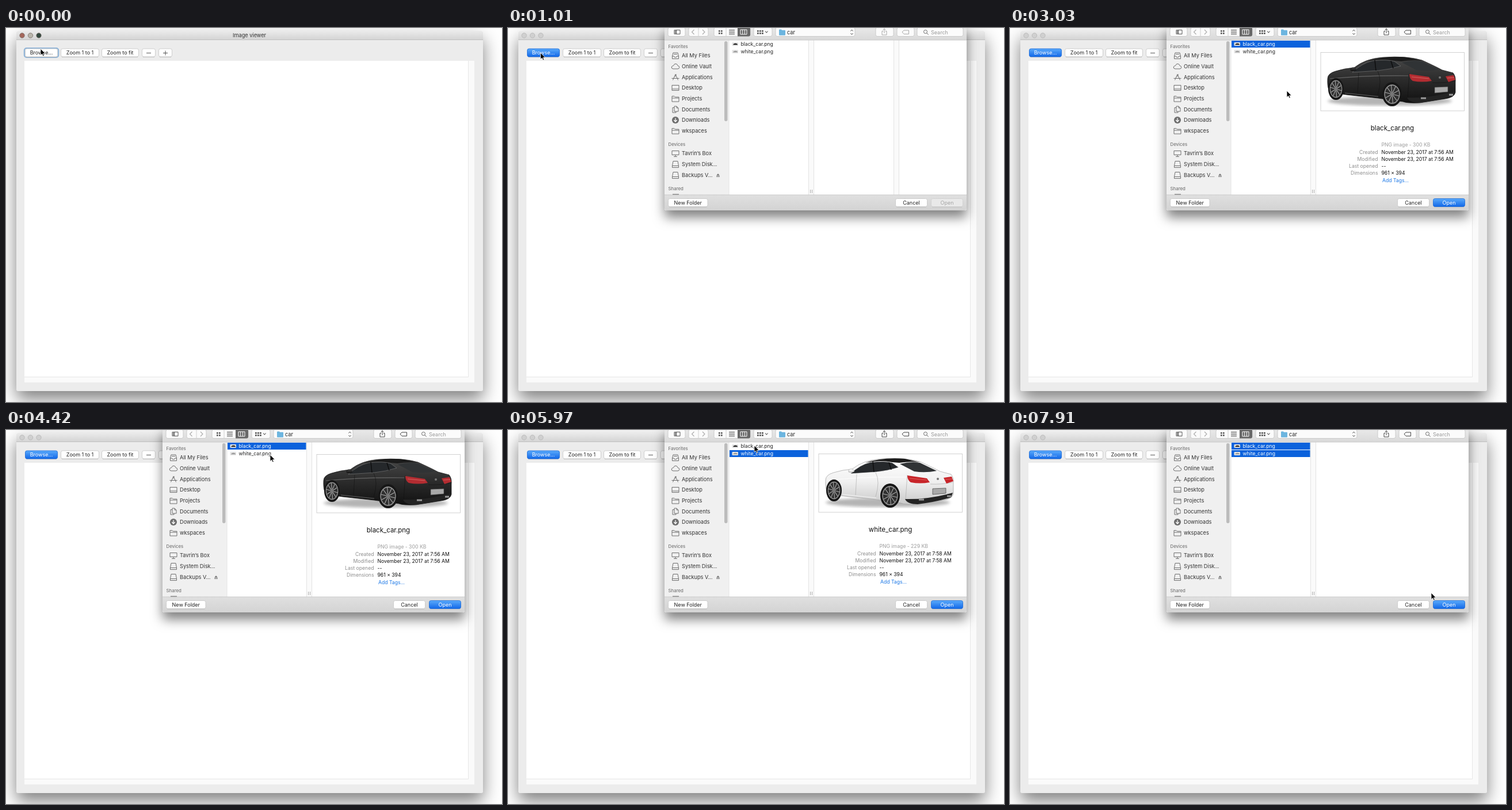
Animation of 862 by 650 pixels, one loop 7.99 s. Source, as an HTML page:

```html
<!DOCTYPE html>
<html lang="en">
<head>
<meta charset="utf-8">
<title>Image viewer</title>
<style>
  html, body { margin: 0; width: 100%; height: 100%; overflow: hidden; background: #fff; }
  svg { display: block; width: 862px; height: 650px; }
  text { font-family: Inter, "Open Sans", sans-serif; font-size: 9px; white-space: pre; }
</style>
</head>
<body>
<svg id="stage" viewBox="0 0 862 650" xmlns="http://www.w3.org/2000/svg"></svg>
<script>
const LOOP = 7990;

// Drawing helpers; text is placed by its vertical centre.
const rect = (x, y, w, h, fill, more = '') =>
  `<rect x="${x}" y="${y}" width="${w}" height="${h}" fill="${fill}" ${more}/>`;
const line = (d, color = '#666', width = 1, more = '') =>
  `<path d="${d}" fill="none" stroke="${color}" stroke-width="${width}" ${more}/>`;
const shape = (d, fill, more = '') => `<path d="${d}" fill="${fill}" ${more}/>`;
const text = (x, cy, s, size = 9, fill = '#222', more = '') =>
  `<text x="${x}" y="${(cy + size * 0.36).toFixed(2)}" style="font-size:${size}px" fill="${fill}" ${more}>${s}</text>`;
const middle = 'text-anchor="middle"';
const group = (id, body, more = '') => `<g id="${id}" ${more}>${body}</g>`;
const gradient = (id, ...colors) => `<linearGradient id="${id}" x2="0" y2="1">` +
  colors.map((c, i) => `<stop offset="${i / (colors.length - 1)}" stop-color="${c}"/>`).join('') +
  '</linearGradient>';
const shadow = (id, dy, blur, alpha) =>
  `<filter id="${id}" x="-20%" y="-20%" width="140%" height="150%">
    <feDropShadow dx="0" dy="${dy}" stdDeviation="${blur}" flood-opacity="${alpha}"/></filter>`;

function button(x, y, w, label, style = 'plain') {
  const [fill, edge, ink] = {
    plain: ['#fff', '#c4c4c4', '#222'],
    blue: ['url(#blue)', '#1a69d6', '#fff'],
    off: ['#e9e9e9', '#cfcfcf', '#a5a5a5']
  }[style];
  return line(`M${x + 2} ${y + 15}h${w - 4}`, '#aaa', 0.7) +
    rect(x + .5, y + .5, w - 1, 14, fill, `rx="3" stroke="${edge}" stroke-width=".8"`) +
    text(x + w / 2, y + 7.3, label, 9, ink, middle);
}
const toolBox = (x, w) => rect(x, -1, w, 15.5, '#fbfbfb', 'rx="3" stroke="#c3c3c3" stroke-width=".8"');

function lights(colors, edge) {
  return colors.map((c, i) =>
    `<circle cx="${28 + i * 14.5}" cy="13" r="4.2" fill="${c}" stroke="${edge}" stroke-width=".8"/>`).join('');
}

function mainWindow() {
  return group('window',
    rect(18, 5, 811, 626, '#ececec', 'rx="4" filter="url(#windowShadow)"') +
    shape('M18 21V9q0-4 4-4H825q4 0 4 4V21Z', 'url(#titleBar)') +
    line('M18 20.5H829', '#bcbcbc', .8)) +
    text(423, 13, 'Image viewer', 9.2, '#333', middle) +
    group('lightsOn', lights(['#a4665b', '#b9b6ac', '#33483f'], '#776b66')) +
    group('lightsOff', lights(['#d0d0d0', '#d0d0d0', '#d0d0d0'], '#b4b4b4')) +
    rect(32, 57, 782, 559, '#fafafa') + rect(32, 57, 772, 549, '#fff') +
    line('M32 606.5H804M803.5 57V606', '#e7e7e7') +
    group('focusRing', rect(31.8, 35, 59.5, 16, 'none', 'rx="4" stroke="#8bb2d8" stroke-width="2"')) +
    group('browseIdle', button(33, 35.5, 57, 'Browse...')) +
    group('browsePressed', button(33, 35.5, 57, 'Browse...', 'blue')) +
    button(95, 35.5, 67, 'Zoom 1 to 1') + button(166, 35.5, 65, 'Zoom to fit') +
    button(236, 35.5, 24, '') + button(265, 35.5, 24, '') +
    line('M244 43.5h8M273 43.5h8M277 39.5v8', '#444', .9);
}

function toolbar() {
  const grid = [0, 1, 2, 3].map(i => rect(366 + i % 2 * 4, 4 + (i >> 1) * 4, 2.6, 2.6, '#555')).join('');
  const arrange = [0, 1, 2, 3, 4, 5].map(i => rect(433 + i % 3 * 4, 4 + (i >> 1) * 0 + (i > 2 ? 4 : 0), 2.8, 2.6, '#555')).join('');
  return toolBox(278, 30) + line('M289 3.5h10v7h-10zM292.5 3.5v7', '#555') + rect(289, 3.5, 3, 7, '#999') +
    toolBox(314, 34) + line('M331 -1v15', '#d0d0d0') +
    line('M323.5 3l-4 4 4 4M338 3l4 4-4 4', '#aaa', 1.1) +
    toolBox(358, 63) + shape('M399 -1h19q3 0 3 3v9.500q0 3-3 3h-19z', '#686868') +
    line('M379 -1v15', '#d0d0d0') + grid + line('M384 3.500h10M384 6h10M384 8.500h10M384 11h10', '#555') +
    line('M404 3h11v8h-11zM407.700 3v8M411.400 3v8', '#fff') +
    toolBox(427, 32) + arrange + line('M447 5.500l2.300 2.500 2.300-2.500', '#555', 1.1) +
    toolBox(465, 138) + shape('M471 3.500q0-1 1-1h3l1 1.300h5q1 0 1 1v7q0 1-1 1h-9q-1 0-1-1z', '#6cb5df') +
    text(485, 7.3, 'car', 9.2) + line('M595.500 5.500l2-2.500 2 2.500M595.500 9l2 2.500 2-2.500', '#555') +
    toolBox(639, 31) + toolBox(676, 30) +
    group('tools', line('M652 5.500h-2v6.500h8V5.500h-2M654 9V1.500M651.700 3.500l2.300-2.300 2.300 2.300', '#444') +
      line('M685 7l3-3h8.500v6.500h-8.500z', '#444')) +
    toolBox(711, 80) + `<circle cx="725.500" cy="6.500" r="3" fill="none" stroke="#666"/>` +
    line('M727.700 8.700l3 3') + text(735, 7.3, 'Search', 9, '#999');
}

const folder = 'M-6-4.500h4l1.500 1.500H6v8H-6zM-6-1.200H6';
const disk = 'M-4-5.500h8l1.500 8v3h-11v-3zM-5.500 2.500h11';
const icons = {
  tray: 'M-4-5h8l1.500 6v4.500h-11V1zM-5.500 1h3l1 2h3l1-2h3M-3-2.500h6',
  cloud: 'M-4 4.500q-3-.3-2.800-3Q-6-1-3.500-1 -2-5 1-4.200q2.600.7 3 3.200 3 .5 2.800 3Q6.500 4.500 4 4.500z',
  apps: 'M-4.500 5L0-5 4.500 5M-6.500 2H6.500M1.500-5l-2 4',
  desktop: 'M-6-4.500H6v9H-6zM-6 2H6',
  docs: 'M-2-5.500h4l3 3v6h-7zM-2-3h-3v8.500h6v-2M2-5.500v3h3',
  screen: 'M-6-4.500H6v7H-6zM-3 5.500h6M0 2.500v3',
  folder, disk
};
const icon = (name, x, y) => line(icons[name], '#6e6e6e', 1, `transform="translate(${x} ${y})"`);

function sidebarRows() {
  const rows = [
    ['tray', 48, 'All My Files'], ['cloud', 66.5, 'Online Vault'], ['apps', 85.5, 'Applications'],
    ['desktop', 104, 'Desktop'], ['folder', 123, 'Projects'], ['docs', 141.5, 'Documents'],
    ['', 160, 'Downloads'], ['folder', 179, 'wkspaces'], ['screen', 218, 'Tavrin’s Box'],
    ['disk', 237, 'System Disk...'], ['disk', 256, 'Backups V...']
  ];
  const heads = [['Favorites', 32], ['Devices', 202], ['Shared', 279]];
  return rows.map(([name, y, label]) =>
    (name ? icon(name, 291, y) : `<circle cx="291" cy="${y}" r="6" fill="#6e6e6e"/>` +
      line(`M291 ${y - 3.5}v6.500M288.300 ${y}l2.700 3 2.700-3`, '#fff', 1.3)) +
    text(302, y, label, 9.2, '#333')).join('') +
    heads.map(([s, y]) => text(278.5, y, s, 7.8, '#777', 'font-weight="500"')).join('') +
    shape('M362 256.500l3-3.500 3 3.500zM362 257.500h6v1.200h-6z', '#777') +
    rect(286, 288.5, 11, 4, '#777') + rect(376, 23, 5.5, 139, '#bcbcbc', 'rx="2.700"');
}

function mediaRows() {
  const music = 'M-2.500 4V-5l6-1V3M-2.500-2.500l6-1';
  const camera = 'M-6-3h3l1.500-2h3L3-3h3v7.500H-6zM2.500.7a2.500 2.500 0 1 1-5 0 2.500 2.500 0 1 1 5 0';
  const film = 'M-5-5.500v11M5-5.500v11M-3-5.500v11M3-5.500v11M-5-5H5M-5 0H5M-5 5H5';
  return text(278.5, 32, 'Media', 7.8, '#777', 'font-weight="500"') +
    [[music, 49, 'Music'], [camera, 67.5, 'Photos'], [film, 86.5, 'Movies']].map(([d, y, label]) =>
      line(d, '#6e6e6e', 1, `transform="translate(291 ${y})"`) + text(302, y, label, 9.2, '#333')).join('');
}

function fileRow(id, y, name, tone) {
  const row = ink => rect(389.5, y - 3, 10.5, 6, '#e3e3e3', 'rx="1"') +
    shape(`M391 ${y + 1.2}l1-1.500 2-1h2.500l2 1 .5 1.500z`, tone) + text(404.5, y, name, 8.6, ink);
  return row('#222') + group(id, rect(385, y - 6, 136.5, 12, '#0b62dc') + row('#fff'));
}

function wheel(cx, cy, rx, ry) {
  const ellipse = (k, fill) => `<ellipse cx="${cx}" cy="${cy}" rx="${rx * k}" ry="${ry * k}" fill="${fill}"/>`;
  let spokes = '';
  for (let i = 0; i < 10; i++) {
    const a = i * Math.PI / 5 + .2;
    spokes += `M${cx} ${cy}l${(rx * .72 * Math.cos(a)).toFixed(1)} ${(ry * .72 * Math.sin(a)).toFixed(1)}`;
  }
  return ellipse(1, '#171717') + ellipse(.8, '#999') + ellipse(.72, '#303030') +
    line(spokes, '#aaa', 1.1) + ellipse(.18, '#777');
}

function car(id, paint, edge, crease, lamp) {
  return group(id,
    '<ellipse cx="660" cy="127" rx="108" ry="8" fill="#777" opacity=".55" filter="url(#soft)"/>' +
    shape('M552 88Q552 79 566 75Q582 70 598 69Q618 53 648 51Q690 48 716 56Q738 66 751 73L770 78Q775 84 774 94L774 112Q772 121 756 123L712 130Q690 131 683 128L640 122 585 116 556 112Q551 104 552 88Z',
      paint, `stroke="${edge}" stroke-width=".7"`) +
    shape('M621 58Q650 48 690 51L716 57Q700 55 680 58L668 57Q645 53 621 58Z', '#1b1b1b') +
    shape('M595 77Q612 61 630 57Q655 54 668 58L679 66Q660 72 640 74Z', '#25282b', `stroke="${crease}" stroke-width=".6"`) +
    line('M634 56l2 18M662 57l4 13', '#0c0c0c', 1.4) +
    shape('M681 60Q700 55 716 58L745 72Q725 76 706 73Z', '#303335') +
    line('M556 88Q620 82 692 83M582 113L640 119', crease, 1.2, 'opacity=".7"') +
    line('M606 78l-2 36M639 75q8 15 0 42M694 79l-3 42M734 95q18 1 39-3M555 96l4 12', edge, .8, 'opacity=".7"') +
    shape('M592 71q1-3 7-2l3 4q-4 3-10 1z', paint, `stroke="${edge}" stroke-width=".6"`) +
    shape('M694 80L728 85 733 92Q716 95 700 92Q694 88 694 80ZM757 84L771 82 774 90 762 94Z', lamp) +
    line('M698 85l30 3M760 87l12-1', '#e17a72', 1, 'opacity=".7"') +
    shape('M690 121Q730 122 773 110L770 118Q745 126 712 130Q694 130 690 121Z', '#242424') +
    shape('M738 103l23-1v9l-23 2z', '#a9a9a9', 'stroke="#444" stroke-width=".7"') +
    '<circle cx="747" cy="86" r="2" fill="#777"/>' +
    line('M714 122h9M763 116h7', '#999', 3) +
    wheel(566.5, 106, 13.5, 19) + wheel(664, 115, 17, 21));
}

function preview() {
  const labels = ['Created', 'Modified', 'Last opened', 'Dimensions'];
  const info = (id, name, size, time) => {
    const date = `November 23, 2017 at ${time} AM`;
    return group(id, text(664.5, 174, name, 11.5, '#111', middle) +
      text(645.5, 203, `PNG image - ${size} KB`, 8.65, '#aaa', 'font-weight="500"') +
      [date, date, '--', '961 × 394'].map((s, i) => text(645.5, 215.5 + i * 12.2, s, 8.65, '#111')).join(''));
  };
  return rect(540, 42.5, 249.5, 101.5, '#fff', 'stroke="#c6c6c6" stroke-width=".8"') +
    car('carBlack', 'url(#blackPaint)', '#111', '#7d7d7d', '#b32c31') +
    car('carWhite', 'url(#whitePaint)', '#a0a0a0', '#fff', '#c8252a') +
    labels.map((s, i) => text(639.5, 215.5 + i * 12.2, s, 8.65, '#8d8d8d', 'text-anchor="end"')).join('') +
    info('infoBlack', 'black_car.png', 300, '7:56') + info('infoWhite', 'white_car.png', 229, '7:58') +
    text(647, 264.5, 'Add Tags...', 8.65, '#1c78e6');
}

const divider = x => rect(x, 21, 10, 269, '#fafafa') + line(`M${x + .5} 21V290M${x + 9.5} 21V290`, '#e3e3e3');

function sheet() {
  return rect(272, -6, 525, 323, '#fff', 'rx="4" filter="url(#sheetShadow)"') +
    shape('M272 21V-2q0-4 4-4H793q4 0 4 4V21Z', 'url(#toolBar)') + toolbar() +
    rect(272, 21, 112, 269, '#f0f0f0') +
    group('media', mediaRows()) + group('places', sidebarRows()) +
    line('M384 21V290', '#e0e0e0', .8) + divider(522) + line('M525.500 281v6M528.500 281v6', '#999', .8) +
    group('columns', divider(670)) +
    group('files', fileRow('selBlack', 28, 'black_car.png', '#222') + fileRow('selWhite', 41, 'white_car.png', '#999')) +
    group('preview', preview()) +
    shape('M272 290H797V313q0 4-4 4H276q-4 0-4-4Z', 'url(#footer)') +
    line('M272 21H797M272 290H797', '#c2c2c2', .8) +
    button(278, 296, 69.5, 'New Folder') + button(673, 296, 56, 'Cancel') +
    group('openOff', button(735, 296, 56, 'Open', 'off')) +
    group('openOn', button(735, 296, 56, 'Open', 'blue'));
}

const stage = document.getElementById('stage');
stage.innerHTML = '<defs>' +
  gradient('titleBar', '#ebebeb', '#d3d3d3') + gradient('toolBar', '#ededed', '#d9d9d9') +
  gradient('footer', '#e0e0e0', '#d3d3d3') + gradient('blue', '#5aaafb', '#1268e8') +
  gradient('blackPaint', '#484848', '#2b2b2b', '#111') + gradient('whitePaint', '#fff', '#f0f0f0', '#c9c9c9') +
  shadow('windowShadow', 14, 15, .5) + shadow('sheetShadow', 12, 10, .5) +
  '<filter id="soft"><feGaussianBlur stdDeviation="2.500"/></filter></defs>' +
  mainWindow() + group('sheet', sheet()) +
  group('cursor', shape('M0 0V11.500L2.700 9 4.400 13 6.300 12.200 4.600 8.400H8.200Z', '#000', 'stroke="#fff" stroke-width=".8"'));

const parts = {};
stage.querySelectorAll('g[id]').forEach(g => parts[g.id] = g);

// Pointer trips: first step, last step, step count, end x, end y, optional sag.
const trips = [
  [80, 80, 1, 58, 37], [230, 460, 4, 56.5, 43],
  [1560, 2170, 9, 443, 27, 36], [2490, 2800, 5, 481, 109],
  [3410, 3730, 5, 666, 87], [3880, 4420, 8, 459, 43],
  [4650, 5190, 8, 650, 92], [5510, 5740, 4, 432, 31], [5890, 5970, 2, 428, 27],
  [6500, 6750, 4, 432, 43], [6900, 6900, 1, 431.5, 44], [7220, 7220, 1, 431, 44],
  [7600, 7910, 5, 732, 283]
];

function pointer(t) {
  let x = 60, y = 36;
  for (const [from, to, count, endX, endY, sag = 0] of trips) {
    if (t < from) break;
    const gap = count > 1 ? (to - from) / (count - 1) : 1;
    const p = Math.min(count, Math.floor((t - from) / gap + .02) + 1) / count;
    const e = p * p * (3 - 2 * p);
    x += (endX - x) * e;
    y += (endY - y) * e + sag * Math.sin(Math.PI * e);
  }
  return [x, y];
}

function show(flags) {
  for (const id in flags) parts[id].setAttribute('display', flags[id] ? 'inline' : 'none');
}

function draw(t) {
  const opened = t >= 1010, chosen = t >= 2490;
  const white = t >= 4650 && t < 6500, both = t >= 7370;
  const whiteInfo = t >= 4730 && t < 6580;
  show({
    lightsOn: t < 860, lightsOff: t >= 860, focusRing: !opened,
    browseIdle: t < 610, browsePressed: t >= 610,
    sheet: t >= 860, media: !opened, places: opened, files: opened,
    columns: !chosen, openOff: !chosen, openOn: chosen,
    selBlack: chosen && !white, selWhite: white || both,
    preview: t >= 2950 && t < 7450,
    carBlack: !whiteInfo, infoBlack: !whiteInfo, carWhite: whiteInfo, infoWhite: whiteInfo
  });
  const scale = t < 930 ? .54 : opened ? 1 : .653;
  parts.sheet.setAttribute('transform', `translate(534.5 155.5) scale(${scale}) translate(-534.5 -155.5)`);
  parts.sheet.setAttribute('opacity', t < 930 ? .6 : opened ? 1 : .92);
  parts.tools.setAttribute('opacity', chosen ? 1 : .45);
  parts.preview.setAttribute('opacity', t < 3030 ? .6 : 1);
  parts.preview.setAttribute('transform', `translate(0 ${t < 4730 ? 0 : -1})`);
  parts.cursor.setAttribute('transform', `translate(${pointer(t).map(v => v.toFixed(1))})`);
}

const start = performance.now();
function tick() {
  draw((performance.now() - start) % LOOP);
  requestAnimationFrame(tick);
}
tick();
</script>
</body>
</html>
```
